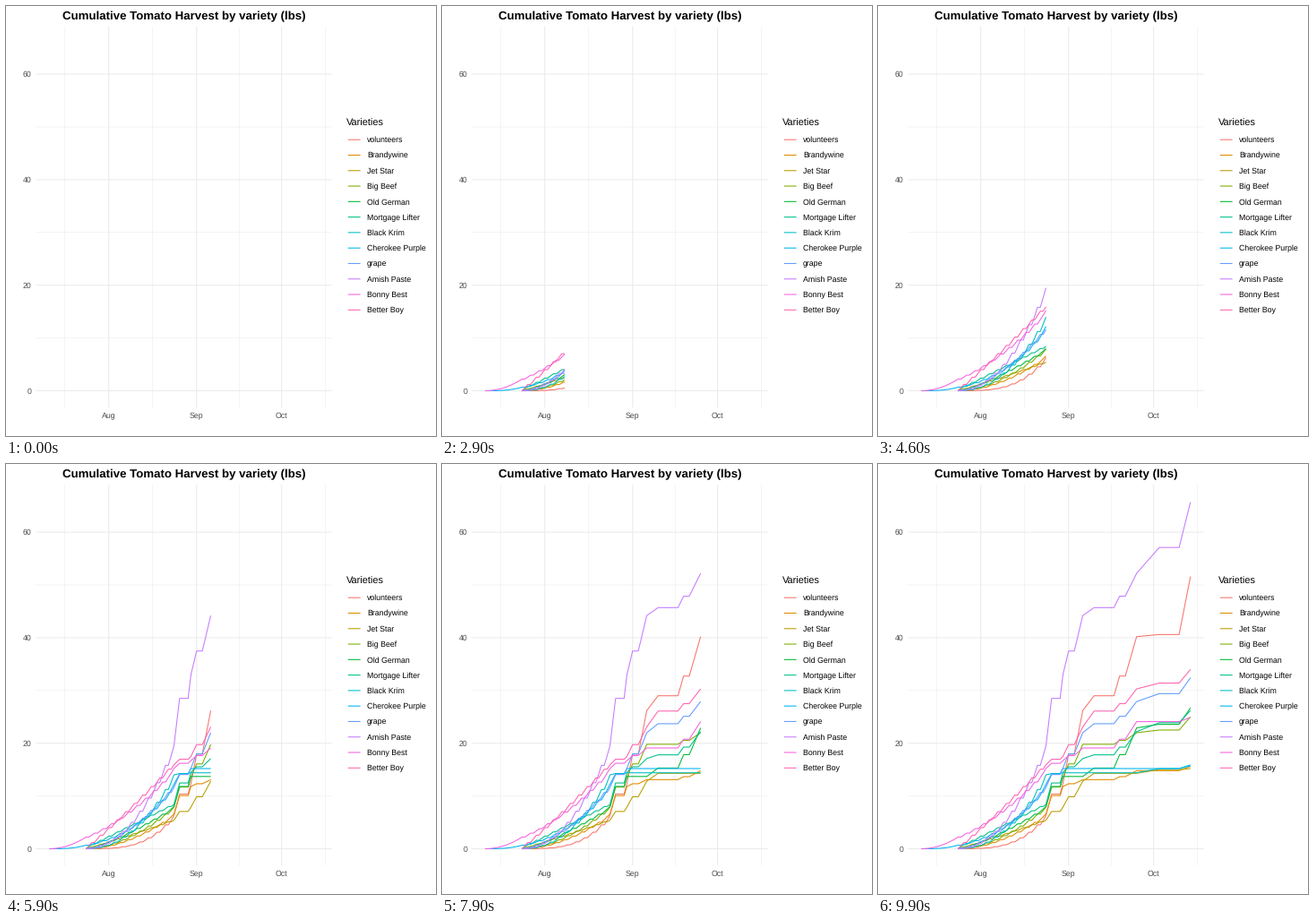
Animation, 480 px wide and 480 px high, one loop 10 s. Source, as a matplotlib script:

```python
import numpy as np
import matplotlib.pyplot as plt
from matplotlib.animation import FuncAnimation

plt.rcParams.update({
    "font.family": "Liberation Sans",
    "text.hinting": "no_hinting",
    "path.snap": False,
})

SIZE, DPI = 480, 80
FRAMES, INTERVAL = 100, 100
LAST_DAY = 95                      # 11 July to 14 October
X0, DX = 48.3, 3.163               # pixels per day
Y0, DY = 429.5, 5.89               # pixels per pound
LEFT, RIGHT, TOP, BOTTOM = 33.4, 363.7, 23.2, 448.0
GRID, LINE = "#EBEBEB", 1.07

DAYS = np.arange(LAST_DAY + 1)
CHECKS = [44, 50, 57, 68, 76, 88, 95]                       # days with known totals
RESTS = [(46, 49), (52, 54), (61, 68), (70, 72), (84, 91)]  # nothing is picked


def px(n):
    """Pixels to points."""
    return n * 72 / DPI


def day_x(day):
    return X0 + DX * day


def lbs_y(lbs):
    return Y0 - DY * lbs


fig = plt.figure(figsize=(SIZE / DPI, SIZE / DPI), dpi=DPI, facecolor="white")
ax = fig.add_axes([0, 0, 1, 1])
ax.set_xlim(0, SIZE)
ax.set_ylim(SIZE, 0)
ax.axis("off")


def label(x, y, text, size=8.8, color="black", **kw):
    ax.text(x, y, text, fontsize=px(size), color=color, va="baseline", **kw)


def stroke(xs, ys, color, width=LINE, z=1):
    line, = ax.plot(xs, ys, color=color, lw=px(width), zorder=z,
                    solid_capstyle="butt", solid_joinstyle="round")
    return line


# Grid and axes
for day in (5.5, 36.5, 67, 97.5):
    stroke([day_x(day)] * 2, [TOP, BOTTOM], GRID, LINE / 2)
for lbs in (10, 30, 50):
    stroke([LEFT, RIGHT], [lbs_y(lbs)] * 2, GRID, LINE / 2)
for day, month in ((21, "Aug"), (52, "Sep"), (82, "Oct")):
    stroke([day_x(day)] * 2, [TOP, BOTTOM], GRID)
    label(day_x(day), 460.2, month, color="#4D4D4D", ha="center")
for lbs in (0, 20, 40, 60):
    stroke([LEFT, RIGHT], [lbs_y(lbs)] * 2, GRID)
    label(28.6, lbs_y(lbs) + 3.1, str(lbs), color="#4D4D4D", ha="right")

label(198.5, 15, "Cumulative Tomato Harvest by variety (lbs)", 13.2,
      ha="center", weight="bold")
label(380, 134, "Varieties", 11)


def harvest(row, totals, power, first):
    """Daily totals: an eased start with a pause every third day, then
    steady picking between the check days, broken by the shared rests."""
    work = np.ones(len(DAYS))
    for a, b in RESTS:
        work[a + 1:b + 1] = 0
    work[(DAYS > 13) & (DAYS < CHECKS[0]) & ((DAYS + row) % 3 == 0)] = 0
    done = np.cumsum(work)
    begin, end = done[first], done[CHECKS[0]]
    early = totals[0] * np.clip((done - begin) / (end - begin), 0, 1) ** power
    late = np.interp(done, done[CHECKS], totals)
    return np.where(DAYS < CHECKS[0], early, late)


# Name, colour, growth power, first day, pounds on the check days
VARIETIES = [
    ("volunteers", "#F8766D", 3.3, 13, (6.3, 12.4, 26.2, 29, 40.2, 40.6, 51.6)),
    ("Brandywine", "#DE8C00", 1.8, 13, (6.6, 11.8, 13.1, 13.1, 14.8, 14.8, 15.6)),
    ("Jet Star", "#B79F00", 1.1, 13, (5.4, 7.9, 12.8, 14.3, 14.3, 15, 15.2)),
    ("Big Beef", "#7CAE00", 1.8, 13, (7.9, 13.6, 19.8, 19.8, 22, 22.5, 25)),
    ("Old German", "#00BA38", 1.3, 13, (8, 13.7, 13.7, 15.3, 22.9, 23.6, 26.7)),
    ("Mortgage Lifter", "#00C08B", 1, 13, (8.4, 14.5, 17.1, 17.8, 22.2, 23.9, 26.2)),
    ("Black Krim", "#00BFC4", 2.2, 13, (14, 14.4, 14.4, 14.4, 14.4, 15.2, 15.9)),
    ("Cherokee Purple", "#00B4F0", 3, 0, (12.2, 15.2, 15.2, 15.2, 15.2, 15.2, 15.7)),
    ("grape", "#619CFF", 1.7, 13, (11.6, 15.3, 22, 23.7, 27.9, 29.4, 32.4)),
    ("Amish Paste", "#C77CFF", 2.1, 13, (19.5, 33, 44.2, 45.7, 52.2, 57.1, 65.7)),
    ("Bonny Best", "#F564E3", 2, 0, (15.2, 16.7, 19.1, 19.1, 24.1, 24.1, 24.9)),
    ("Better Boy", "#FF64B0", 1.1, 13, (15.9, 17.5, 23.1, 26.1, 30.3, 31.4, 34)),
]

curves = []
for row, (name, color, power, first, totals) in enumerate(VARIETIES):
    y = 149.2 + 17.28 * row
    stroke([381.8, 395.6], [y, y], color)
    label(403, y + 3.1, name)
    lbs = harvest(row, totals, power, first)
    curves.append((stroke([], [], color, z=2), first, lbs_y(lbs)))


def draw(frame):
    day = round(frame * LAST_DAY / (FRAMES - 1))
    for line, first, ys in curves:
        shown = slice(first, day + 1)
        line.set_data(day_x(DAYS[shown]), ys[shown])
    return [line for line, _, _ in curves]


anim = FuncAnimation(fig, draw, frames=FRAMES, interval=INTERVAL,
                     repeat=True, repeat_delay=0, blit=False)
plt.show()
```
